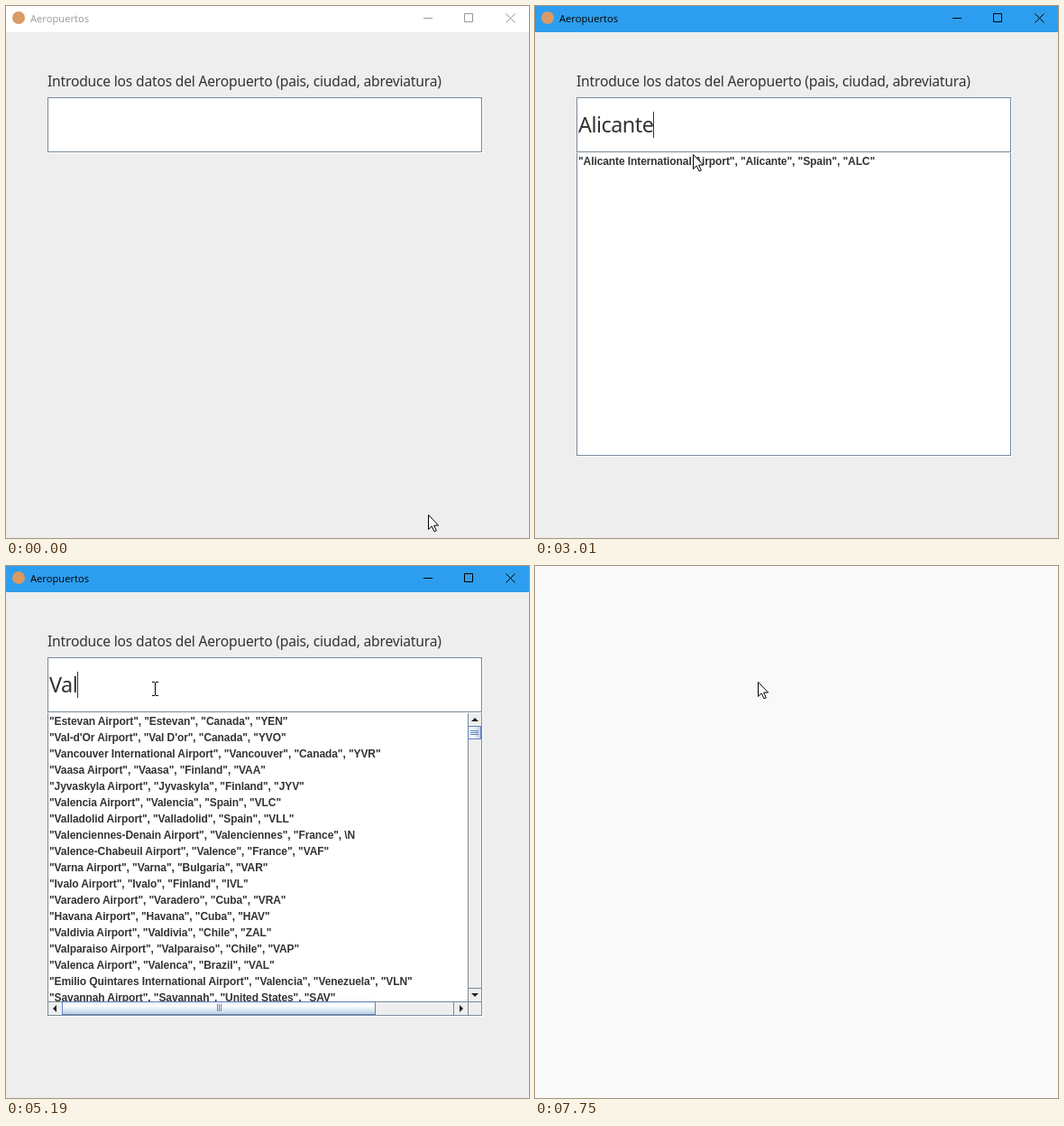
These frames come from a looping animation (580 px wide and 589 px high, 8000 ms). An HTML page:

```html
<!DOCTYPE html>
<html lang="es">
<head>
<meta charset="utf-8">
<title>Aeropuertos</title>
<style>
html, body { margin: 0; width: 100%; height: 100%; overflow: hidden; background: #f9f9f9; }
#stage { position: relative; width: 580px; height: 589px; overflow: hidden; }
#stage div, #stage svg { position: absolute; box-sizing: border-box; }
#window { inset: 0; background: #eee; }
#bar { width: 580px; height: 29px; background: #fff; color: #999; }
#bar.active { background: #2d9eef; color: #000; }
#icon { left: 7px; top: 6px; width: 14px; height: 14px; border-radius: 50%; background: #d99a66; }
#title { left: 27px; top: 0; font: 11.2px/28px "Open Sans", sans-serif; }
#closeHot { left: 535px; top: 0; width: 45px; height: 29px; background: #e81123; }
#label { left: 46px; top: 73px; font: 15.6px/20px "Noto Sans", sans-serif; letter-spacing: -.19px; color: #333; white-space: pre; }
.box { left: 46px; width: 482px; background: #fff; border: 1px solid #7a8a99; box-shadow: 1px 1px #fff; }
#field { top: 101px; height: 61px; }
#typed { left: 48px; top: 116px; font: 23.4px/30px "Noto Sans", sans-serif; letter-spacing: -.52px; color: #333; white-space: pre; }
#caret { top: 117px; width: 1px; height: 29px; background: #333; }
#list { top: 162px; height: 336px; border-top-color: #fff; }
#rows { left: 0; top: 0; width: 480px; height: 334px; padding-left: 1px; overflow: hidden;
  font: bold 12px/18px "Liberation Sans", sans-serif; letter-spacing: -.09px; color: #333; white-space: pre; }
.scroll #rows { width: 465px; height: 319px; }
#bars { left: 0; top: 0; display: none; }
.scroll #bars { display: block; }
</style>
</head>
<body>
<div id="stage">
  <div id="window">
    <div id="bar">
      <div id="icon"></div>
      <div id="title">Aeropuertos</div>
      <div id="closeHot"></div>
      <svg width="580" height="29" fill="none" stroke="currentColor">
        <path d="M463 13.5h10M508.5 8.5h9v9h-9z" />
        <path id="cross" d="M554.5 8.5l10 10M564.5 8.5l-10 10" />
      </svg>
    </div>
    <div id="label">Introduce los datos del Aeropuerto (pais, ciudad, abreviatura)</div>
    <div id="field" class="box"></div>
    <div id="typed"></div>
    <div id="caret"></div>
    <div id="list" class="box">
      <div id="rows"></div>
      <svg id="bars" width="480" height="334">
        <defs>
          <linearGradient id="across"><stop stop-color="#dce8f4"/><stop offset=".3" stop-color="#fff"/><stop offset="1" stop-color="#b8cfe5"/></linearGradient>
          <linearGradient id="down" x2="0" y2="1"><stop stop-color="#dce8f4"/><stop offset=".3" stop-color="#fff"/><stop offset="1" stop-color="#b8cfe5"/></linearGradient>
        </defs>
        <path fill="#eee" d="M465 0h15v334h-15zM0 319h480v15H0z"/>
        <path fill="none" stroke="#7a8a99" d="M465.5 0v334M0 319.5h480M465 14.5h15M465 304.5h15M15.5 319v15M449.5 319v15"/>
        <path fill="#222" d="M469 9h8l-4-4zM469 310h8l-4 4zM9 323v8l-4-4zM456 323v8l4-4z"/>
        <g stroke="#6382bf">
          <rect x="465.5" y="14.5" width="14" height="14" fill="url(#across)"/>
          <rect x="15.5" y="319.5" width="347" height="14" fill="url(#down)"/>
          <path d="M468 19.5h9M468 21.5h9M468 23.5h9M187.5 322v8M189.5 322v8M191.5 322v8"/>
        </g>
      </svg>
    </div>
  </div>
  <svg id="pointer" width="16" height="22" overflow="visible">
    <path id="arrow" d="M.5.5v16l3.7-3.6 2.8 6 2.3-1-2.7-5.8h5z" fill="#fff" stroke="#000"/>
    <path id="beam" d="M-3-7.5h3M1-7.5h3M.5-7v14M-3 7.5h3M1 7.5h3" fill="none" stroke="#000"/>
  </svg>
</div>
<script>
const LOOP = 8000, BLINK = 500, VISIBLE_ROWS = 18;
const FOCUS = 380, HOVER = 7040, CLOSE = 7130, FADE = 150;

// name | city | country | code
const airports = String.raw`HÃºsavÃ-k Airport|Husavik|Iceland|HZK
Keflavik International Airport|Keflavik|Iceland|KEF
Reykjavik Airport|Reykjavik|Iceland|RKV
Vestmannaeyjar Airport|Vestmannaeyjar|Iceland|VEY
Winnipeg / St. Andrews Airport|Winnipeg|Canada|YAV
CFB Bagotville|Bagotville|Canada|YBG
Campbell River Airport|Campbell River|Canada|YBL
Clyde River Airport|Clyde River|Canada|YCY
Estevan Airport|Estevan|Canada|YEN
Inuvik Nils Tarvo Airport|Inuvik|Canada|YEV
Forestville Airport|Forestville|Canada|\N
La Grande RiviÃ¨re Airport|La Grande Riviere|Canada|YGL
Gjoa Haven Airport|Gjoa Haven|Canada|YHK
Hay River / Dorwin Halden Airport|Hay River|Canada|YHY
Stephenville Airport|Stephenville|Canada|YJT
Schefferville Airport|Schefferville|Canada|YKL
High Level Airport|High Level|Canada|YOJ
Peace River Airport|Peace River|Canada|YPE
Wewak International Airport|Wewak|Papua New Guinea|WWK
Calgary International Airport|Calgary|Canada|YYC
Halifax International Airport|Halifax|Canada|YHZ
Val-d'Or Airport|Val D'or|Canada|YVO
Vancouver International Airport|Vancouver|Canada|YVR
Algiers Airport|Algiers|Algeria|ALG
Tamale Airport|Tamale|Ghana|TML
Vaasa Airport|Vaasa|Finland|VAA
Aalborg Airport|Aalborg|Denmark|AAL
Savonlinna Airport|Savonlinna|Finland|SVL
Jyvaskyla Airport|Jyvaskyla|Finland|JYV
Alicante International Airport|Alicante|Spain|ALC
Almeria International Airport|Almeria|Spain|LEI
Valencia Airport|Valencia|Spain|VLC
Valladolid Airport|Valladolid|Spain|VLL
Valenciennes-Denain Airport|Valenciennes|France|\N
Valence-Chabeuil Airport|Valence|France|VAF
Alghero Airport|Alghero|Italy|AHO
Varna Airport|Varna|Bulgaria|VAR
Ivalo Airport|Ivalo|Finland|IVL
Bamako Airport|Bamako|Mali|BKO
Varadero Airport|Varadero|Cuba|VRA
Havana Airport|Havana|Cuba|HAV
Valdivia Airport|Valdivia|Chile|ZAL
Valparaiso Airport|Valparaiso|Chile|VAP
Valenca Airport|Valenca|Brazil|VAL
Emilio Quintares International Airport|Valencia|Venezuela|VLN
Alice Springs Airport|Alice Springs|Australia|ASP
Salina Airport|Salina|United States|SLN
Savannah Airport|Savannah|United States|SAV
Valdosta Airport|Valdosta|United States|VLD
Vadodara Airport|Vadodara|India|BDQ
Varanasi Airport|Varanasi|India|VNS`.split("\n").map(line =>
  line.split("|").map(s => s === "\\N" ? s : `"${s}"`).join(", "));

// time, typed text, text the list is filtered by
const typing = [
  [0, "", ""], [1150, "A", ""], [1380, "Al", "al"], [1540, "Ali", "ali"], [1620, "Alic", "alic"],
  [1700, "Alica", "alica"], [1770, "Alican", "alica"], [1840, "Alicant", "alica"], [1920, "Alicante", "alica"],
  [3710, "Alicant", "alica"], [4250, "Alica", "alica"], [4330, "Al", "alica"], [4420, "", ""],
  [4810, "V", ""], [4880, "V", "v"], [5040, "Va", "v"], [5110, "Va", "va"], [5190, "Val", "va"],
  [5270, "Val", "val"], [5340, "Vale", "val"], [5410, "Valen", "vale"], [5490, "Valenc", "valen"],
  [5570, "Valenci", "valenc"], [5640, "Valenci", "valenci"]
];

// time, x, y
const moves = [
  [0, 468, 563], [70, 455, 540], [150, 390, 430], [230, 300, 270], [300, 225, 152], [380, 197, 120], [530, 195, 118],
  [2710, 184, 146], [2780, 176, 168], [2950, 175, 164], [3030, 174, 152], [3100, 173, 142], [3180, 172, 138],
  [3320, 167, 136], [3410, 165, 136], [6190, 166, 135], [6350, 164, 142], [6430, 161, 153], [6570, 158, 172],
  [6740, 200, 140], [6810, 300, 95], [6890, 430, 45], [6970, 530, 18], [7040, 556, 12],
  [7200, 480, 30], [7280, 350, 70], [7360, 250, 98], [7430, 199, 111],
  [7600, 225, 120], [7680, 240, 126], [7750, 247, 128]
];

const ui = Object.fromEntries([...document.querySelectorAll("[id]")].map(el => [el.id, el]));
const show = (el, on) => { el.style.visibility = on ? "" : "hidden"; };
const at = (steps, t) => steps.findLast(step => step[0] <= t);
let shownQuery;

function fillList(query) {
  if (query === shownQuery) return;
  shownQuery = query;
  const found = airports.filter(row => row.toLowerCase().includes(query));
  ui.rows.textContent = found.slice(0, VISIBLE_ROWS).join("\n");
  ui.list.classList.toggle("scroll", found.length > VISIBLE_ROWS);
  ui.list.style.display = query ? "" : "none";
}

function drawPointer(t) {
  const [, x, y] = at(moves, t);
  const inField = t < CLOSE && x > 46 && x < 528 && y > 101 && y < 162;
  ui.pointer.style.transform = `translate(${x}px, ${y}px)`;
  show(ui.beam, inField);
  show(ui.arrow, !inField);
}

function draw(t) {
  const [time, text, query] = at(typing, t);
  const lastKey = Math.max(time, FOCUS) - 30;
  ui.bar.classList.toggle("active", t >= FOCUS);
  ui.typed.textContent = text;
  ui.caret.style.left = Math.round(48 + ui.typed.getBoundingClientRect().width) + "px";
  show(ui.caret, t >= FOCUS && Math.floor((t - lastKey) / BLINK) % 2 === 0);
  fillList(query);
  show(ui.closeHot, t >= HOVER);
  ui.cross.style.stroke = t >= HOVER ? "#fff" : "";
  ui.window.style.opacity = Math.max(0, Math.min(1, 1 - (t - CLOSE) / FADE));
  drawPointer(t);
}

function tick() {
  draw(performance.now() % LOOP);
  requestAnimationFrame(tick);
}
tick();
</script>
</body>
</html>
```
